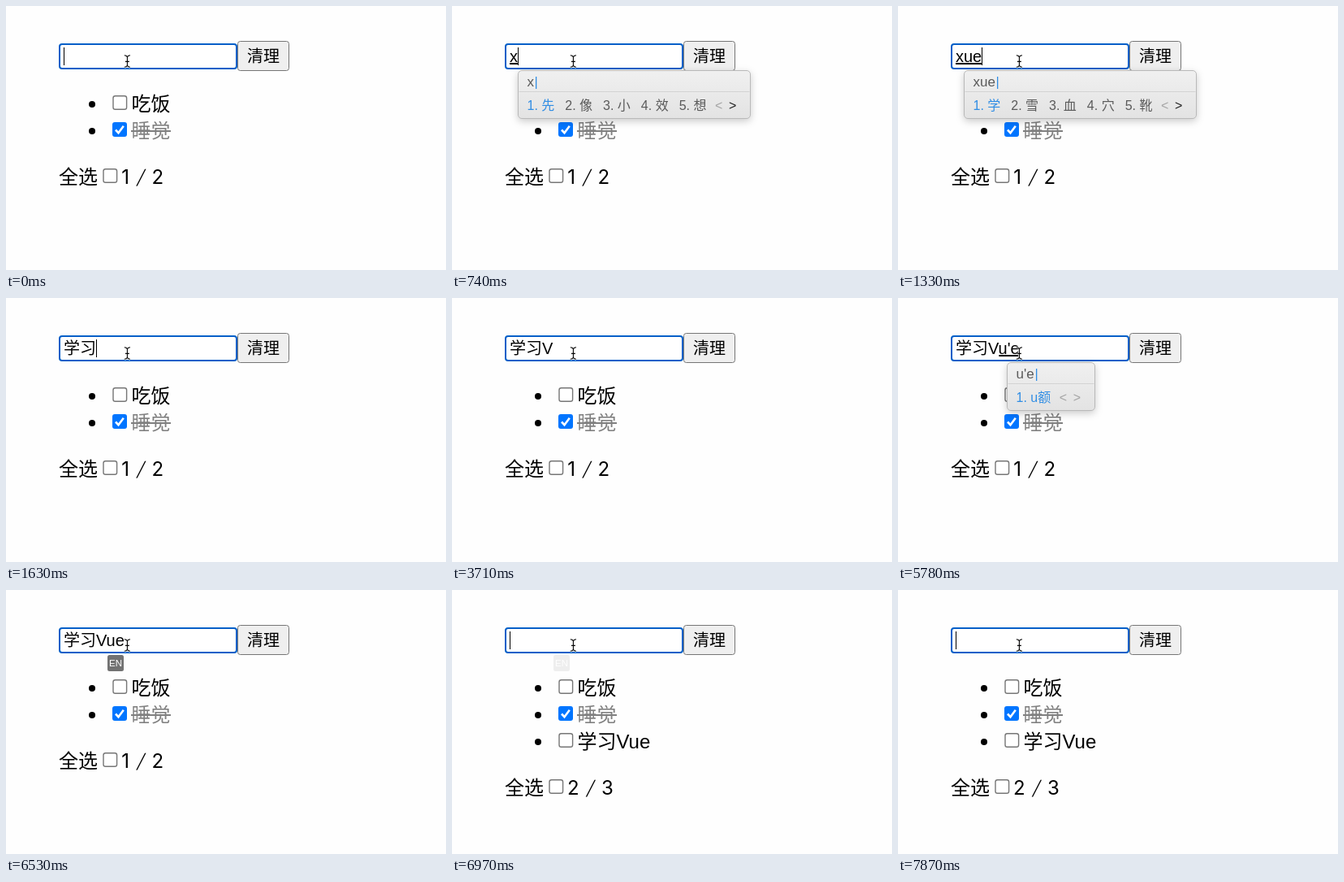
Recreate the animation shown at these times as an HTML page. Size 542 by 325 pixels, loop 8 s.

```html
<!DOCTYPE html>
<html lang="zh-CN">
<head>
<meta charset="utf-8">
<style>
  html, body { margin: 0; width: 100%; height: 100%; overflow: hidden; background: #fefefe; }
  svg { display: block; font: 24px "Liberation Sans", "Noto Sans CJK SC", "Noto Sans CJK", sans-serif; }
  .field { font-size: 20px; }
  .digits { font-family: Inter, "Liberation Sans", sans-serif; }
  .ime { font-size: 16px; fill: #5a5a5a; }
  .blue { fill: #2f8de4; }
  .shadow { filter: drop-shadow(0 3px 5px #0003); }
</style>
</head>
<body>
<svg id="stage" width="542" height="325" viewBox="0 0 542 325"></svg>
<script>
const LOOP = 8000;
const FAMILY = '"Liberation Sans", "Noto Sans CJK SC", "Noto Sans CJK", sans-serif';
const stage = document.getElementById('stage');
const ctx = document.createElement('canvas').getContext('2d');

const measure = (s, size) => {
  ctx.font = `${size}px ${FAMILY}`;
  return ctx.measureText(s).width;
};

// [start ms, committed text, caret visible, composition, candidates]
const states = [
  [0, '', 1],
  [290, '', 0],
  [740, '', 1, 'x', '先 像 小 效 想'],
  [890, '', 1, 'xu', '需 许 须 续 虚'],
  [1190, '', 1, 'xue', '学 雪 血 穴 靴'],
  [1340, '', 1, "xue'x", '学习 学校 学些 学系 学下'],
  [1480, '', 1, "xue'xi", '学习 血洗 血系 学系 血细'],
  [1630, '学习', 1],
  [2070, '学习', 0],
  [2670, '学习', 1],
  [3120, '学习V', 1],
  [3710, '学习V', 0],
  [3860, '学习VU', 1],
  [4160, '学习VUE', 1],
  [4600, '学习VUE', 0],
  [4750, '学习VU', 0],
  [5040, '学习V', 1],
  [5190, '学习V', 1, 'u', 'u U'],
  [5340, '学习V', 1, "u'e", 'u额'],
  [5780, '学习V', 0, "u'e", 'u额'],
  [5930, '学习Vue', 1],
  [6380, '学习Vue', 0],
  [6970, '', 1],
  [7420, '', 0],
  [7870, '', 1]
];
// [start ms, badge opacity]
const badgeSteps = [[0, 0], [5930, 1], [6530, 0.95], [6680, 0.6], [6820, 0.3], [6970, 0.1], [7120, 0]];
const ADDED = 6970;

const at = (steps, t) => steps.filter(s => s[0] <= t).pop();

const text = (s, x, y, attrs = '') => `<text x="${x}" y="${y}" ${attrs}>${s}</text>`;
const rect = (x, y, w, h, attrs = '') => `<rect x="${x}" y="${y}" width="${w}" height="${h}" ${attrs}/>`;

function checkbox(x, y, checked) {
  return checked
    ? rect(x, y, 18, 18, 'rx="3" fill="#0075ff"') +
      `<path d="M${x + 4} ${y + 9.5}l3.5 3.7 6.3-8.4" fill="none" stroke="#fff" stroke-width="2.6"/>`
    : rect(x + 1, y + .7, 16.6, 16.6, 'rx="2.6" fill="#fff" stroke="#767676" stroke-width="1.4"');
}

function item(label, row, done) {
  const y = 110 + row * 33;
  return `<circle cx="106" cy="${y + 11}" r="4"/>` + checkbox(131, y, done) +
    text(label, 154.5, y + 19, done ? 'fill="#808080"' : '') +
    (done ? rect(154, y + 10, 49, 2, 'fill="#808080"') : '');
}

function footer(added) {
  const y = added ? 33 : 0, shift = added ? 4.5 : 0;
  return `<g transform="translate(0 ${y})">` + text('全选', 65, 219) + checkbox(119, 200, false) +
    '<g class="digits">' + text(added ? 2 : 1, added ? 142 : 142.3, 219) +
    text('/', 0, 0, `text-anchor="middle" font-weight="300" transform="translate(${164.5 + shift} 219) skewX(-14)"`) +
    text(added ? 3 : 2, 179.6 + shift, 219) + '</g></g>';
}

function popup(start, typed, words) {
  const left = Math.round(start) + 10.5, tx = left + 11;
  const paged = words.includes(' ') && words.length > 3;
  let x = tx, end = tx, list = '';
  words.split(' ').forEach((word, i) => {
    const label = `${i + 1}. ${word}`;
    list += text(label, x, 128, i ? '' : 'class="blue"');
    end = x + measure(label, 16);
    x = end + 13;
  });
  const width = Math.round(end + 54 - left);
  return '<g class="ime">' +
    rect(left, 79.5, width, 59, 'rx="4.5" fill="url(#panel)" stroke="#b9b9b9" class="shadow"') +
    rect(left + 1, 105, width - 2, 1, 'fill="#d3d3d3"') +
    text(typed, tx, 99, 'font-size="17"') +
    rect(Math.round(tx + measure(typed, 17) + 2), 87, 1.3, 15, 'class="blue"') +
    list + text('&lt;', end + 10.5, 128, 'fill="#a5a5a5"') +
    text('&gt;', end + 27.5, 128, `fill="${paged ? '#222' : '#a5a5a5'}"`) + '</g>';
}

function badge(alpha) {
  return `<g opacity="${alpha}">` + rect(125, 80, 20, 20, 'rx="2.5" fill="#6b6b6b"') +
    text('EN', 135, 94.3, 'font-size="11.5" fill="#fff" text-anchor="middle"') + '</g>';
}

function field([, value, caret, typed = '', words]) {
  const start = 71 + measure(value, 20), end = start + measure(typed, 20);
  return rect(66, 47, 218, 30, 'rx="3" fill="#fff" stroke="#005fc8" stroke-width="2"') +
    '<g class="field">' + text(value + typed, 71, 69) + '</g>' +
    (typed ? rect(start, 70, end - start, 2) + popup(start, typed, words) : '') +
    (caret ? rect(Math.round(end), 51, 1, 22) : '');
}

const beam = 'M145.8 60.7q2.8 0 3.6 2q.8-2 3.6-2M149.4 62.7v10.6M147 68.4h4.8M145.8 75.3q2.8 0 3.6-2q.8 2 3.6 2';
const cursor = `<g fill="none"><path d="${beam}" stroke="#fff" stroke-width="2.6"/>` +
  `<path d="${beam}" stroke="#000" stroke-width="1.1"/></g>`;
const button = rect(285.5, 43.5, 63, 36, 'rx="3" fill="#efefef" stroke="#767676"') +
  text('清理', 297, 69, 'class="field"');
const defs = '<defs><linearGradient id="panel" x2="0" y2="1"><stop stop-color="#f0f0f0"/>' +
  '<stop offset="1" stop-color="#e3e3e3"/></linearGradient></defs>';

const begin = performance.now();
let shown = '';

function draw() {
  const t = (performance.now() - begin) % LOOP, added = t >= ADDED;
  const alpha = at(badgeSteps, t)[1];
  const scene = defs + button + item('吃饭', 0) + item('睡觉', 1, true) +
    (added ? item('学习Vue', 2) : '') + footer(added) +
    field(at(states, t)) + (alpha ? badge(alpha) : '') + cursor;
  if (scene !== shown) stage.innerHTML = shown = scene;
  requestAnimationFrame(draw);
}
draw();
</script>
</body>
</html>
```
